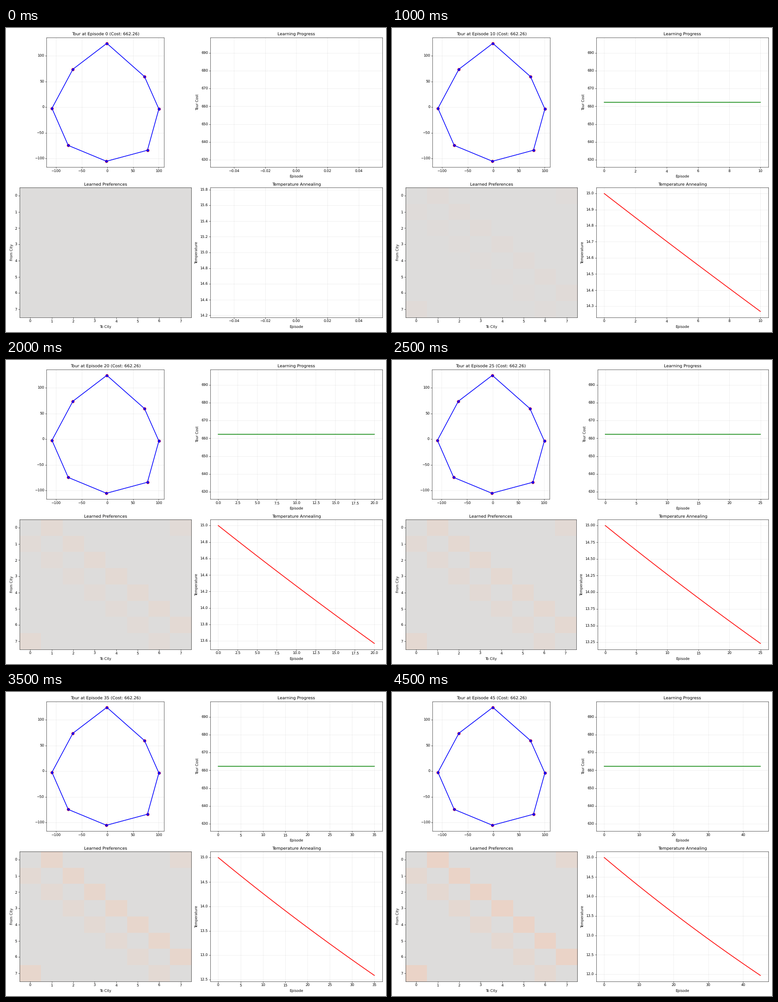
A matplotlib script that plays this animation: 837x669 px, repeating every 5000 ms.

```python
import numpy as np
import matplotlib.pyplot as plt
from matplotlib.animation import FuncAnimation

W, H, DPI = 837, 669, 55.8
STEP, FRAMES, INTERVAL = 5, 10, 500
COST = 662.26
T0, DECAY = 15.0, 0.995

# Panel grid in pixels from the top left corner
LEFT, RIGHT, TOP, BOTTOM = 29.8, 828.6, 20.8, 636.7
ROW_GAP, COL_GAP, DIGIT = 45.1, 42.1, 4.8

CITIES = np.array([
    (100.5, -3.6), (72.5, 59.4), (-0.9, 124.2), (-67.1, 73.8),
    (-107.9, -2.3), (-76.2, -74.6), (-1.7, -105.4), (78.2, -84.0),
])
N = len(CITIES)

plt.rcParams["font.family"] = "DejaVu Sans"
plt.rcParams["text.hinting"] = "none"
fig, ((tour_ax, cost_ax), (pref_ax, temp_ax)) = plt.subplots(
    2, 2, figsize=(W / DPI, H / DPI), dpi=DPI)


def preferences(k):
    """Edges along the tour grow steadily, reversed ones level off."""
    prefs = np.zeros((N, N))
    i = np.arange(N)
    prefs[i, (i + 1) % N] = 0.0062 * k
    prefs[i, (i - 1) % N] = 0.045 * (1 - np.exp(-k / 8))
    return prefs


def draw_tour(episode):
    loop = np.vstack([CITIES, CITIES[:1]])
    tour_ax.scatter(*CITIES.T, c="red", s=60)
    tour_ax.plot(*loop.T, "bo-", linewidth=2, markersize=6)
    tour_ax.set_title(f"Tour at Episode {episode} (Cost: {COST})")
    tour_ax.set_aspect("equal")
    tour_ax.grid(True, alpha=0.3)


def draw_curve(ax, x, y, color, title, ylabel):
    ax.plot(x, y, color, linewidth=2, snap=False)
    ax.set_title(title)
    ax.set_xlabel("Episode")
    ax.set_ylabel(ylabel)
    ax.grid(True, alpha=0.3)


def draw_preferences(k):
    pref_ax.imshow(preferences(k), cmap="coolwarm", vmin=-0.5, vmax=0.5,
                   aspect="auto", interpolation="nearest")
    pref_ax.set_title("Learned Preferences")
    pref_ax.set_xlabel("To City")
    pref_ax.set_ylabel("From City")


def arrange():
    """Widen the column gap when the temperature labels get longer."""
    chars = max(len(t.get_text()) for t in temp_ax.get_yticklabels())
    gap = COL_GAP + DIGIT * (chars - 4)
    col = (RIGHT - LEFT - gap) / 2
    row = (BOTTOM - TOP - ROW_GAP) / 2
    fig.subplots_adjust(left=LEFT / W, right=RIGHT / W,
                        top=1 - TOP / H, bottom=1 - BOTTOM / H,
                        wspace=gap / col, hspace=ROW_GAP / row)


def update(k):
    for ax in fig.axes:
        ax.clear()
    episode = k * STEP
    x = np.arange(episode + 1)
    draw_tour(episode)
    draw_curve(cost_ax, x, np.full(len(x), COST), "g-",
               "Learning Progress", "Tour Cost")
    draw_preferences(k)
    draw_curve(temp_ax, x, T0 * DECAY ** x, "r-",
               "Temperature Annealing", "Temperature")
    arrange()
    return []


anim = FuncAnimation(fig, update, frames=FRAMES, interval=INTERVAL,
                     repeat=True, repeat_delay=0, blit=False)
plt.show()
```
